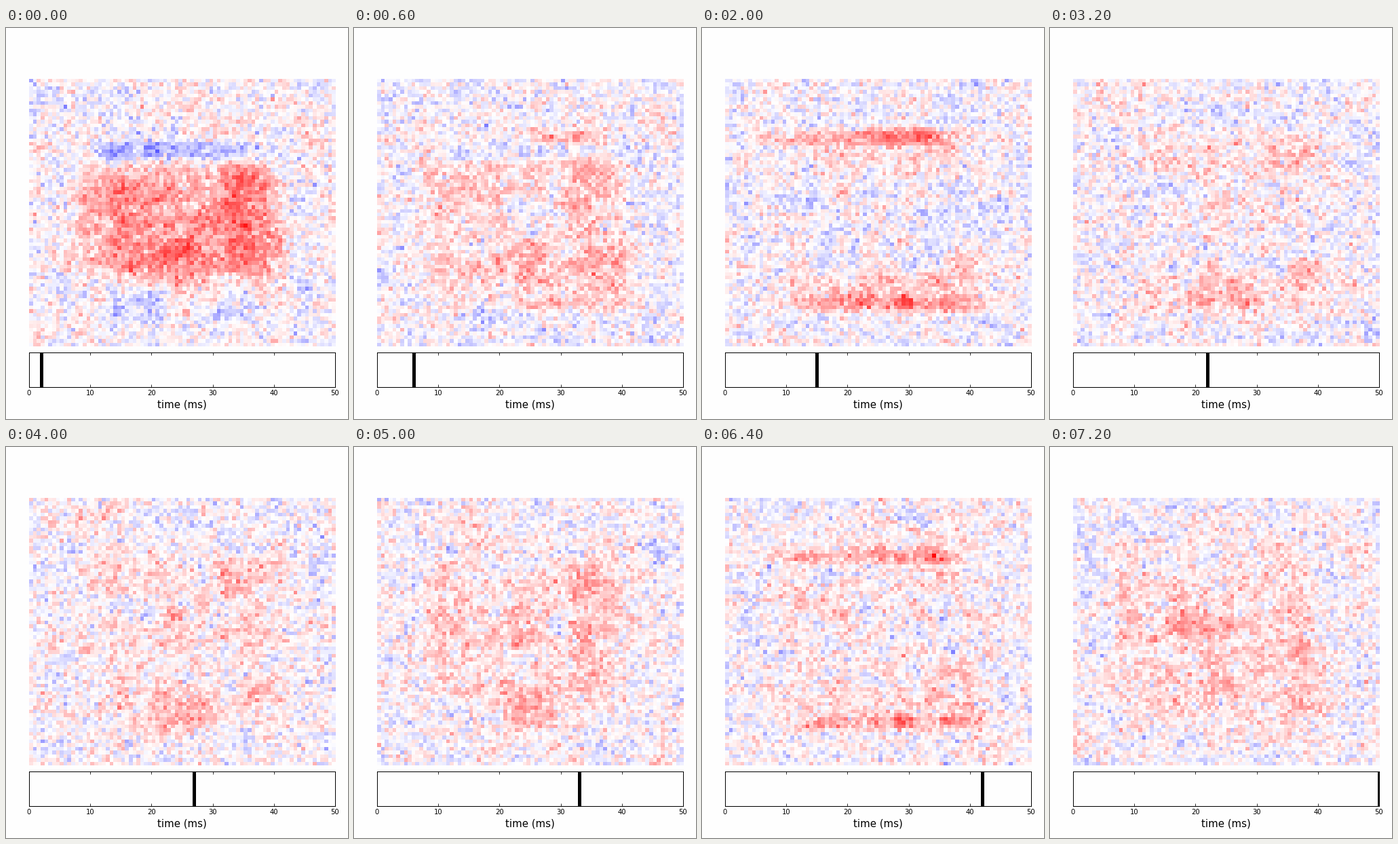
A matplotlib script that plays this animation: 504x576 px, repeating every 7.4 s.

```python
import numpy as np
import matplotlib.pyplot as plt
from matplotlib.animation import FuncAnimation

W, H, DPI = 504, 576, 72
COLS, ROWS = 80, 72
STEPS, INTERVAL = 37, 200
PAPER = "#fefefe"

# Image area in stage pixels, measured from the top left
LEFT, TOP, RIGHT, BOTTOM = 34, 75, 486, 469

# Soft-edged patches: centre x, centre y, half width, half height
PATCHES = {
    "body": (257, 287, 152, 86),
    "wide": (255, 285, 152, 132),
    "top": (235, 162, 145, 13),
    "topmid": (300, 160, 55, 12),
    "upper": (235, 185, 140, 34),
    "upright": (345, 185, 34, 34),
    "shoulder": (120, 190, 20, 25),
    "shelf": (250, 181, 110, 14),
    "core": (275, 282, 130, 52),
    "rim": (215, 323, 60, 9),
    "bottom": (277, 406, 152, 11),
    "lower": (268, 385, 145, 33),
    "hot": (298, 403, 14, 11),
    "belly": (260, 385, 38, 35),
    "column": (357, 270, 30, 85),
    "flank": (380, 360, 32, 38),
    "seed": (252, 335, 20, 24),
    "pocket_l": (192, 404, 42, 25),
    "pocket_r": (340, 410, 30, 24),
    "mid": (220, 268, 55, 32),
    "spine": (296, 262, 10, 30),
    "edge": (120, 245, 18, 80),
}

# Strength of each patch at a few moments (ms on the time axis)
STRENGTH = {
    2: dict(body=.38, shelf=-.32, column=.17, seed=.14, belly=.14,
            pocket_l=-.22, pocket_r=-.18, flank=.06),
    10: dict(upper=.14, topmid=.2, upright=.2, shoulder=.08, core=-.2,
             rim=-.2, spine=-.2, mid=.04, lower=.2, bottom=.17, flank=.18),
    15: dict(top=.25, topmid=.22, upright=.12, upper=.09, bottom=.28,
             lower=.14, belly=.1, hot=.25, flank=.1, core=-.06, mid=.06),
    22: dict(wide=.06, upright=.12, upper=.04, lower=.1, belly=.08,
             hot=.18, flank=.08, bottom=.04, core=-.04, mid=.04),
    33: dict(wide=.12, upright=.1, column=.1, edge=.1, mid=.1,
             belly=.13, shelf=-.02),
    42: dict(wide=.04, top=.17, topmid=.17, upright=.08, bottom=.28,
             hot=.2, flank=.15, lower=.04),
    50: dict(wide=.11, edge=.14, mid=.12, column=.09, flank=.12,
             belly=.08, seed=.08, hot=.08),
}
MOMENTS = list(STRENGTH)
REACHED_AT = [0, 6, 10, 16, 25, 32, 36]

x = LEFT + (np.arange(COLS) + .5) * (RIGHT - LEFT) / COLS
y = TOP + (np.arange(ROWS) + .5) * (BOTTOM - TOP) / ROWS
X, Y = np.meshgrid(x, y)


def patch(cx, cy, rx, ry):
    return np.exp(-((X - cx) / rx) ** 8 - ((Y - cy) / ry) ** 4)


def smooth_noise(rng, passes):
    """Unit-variance noise, blurred over neighbouring cells."""
    z = rng.standard_normal((ROWS, COLS))
    for _ in range(passes):
        for axis in (0, 1):
            z = (np.roll(z, 1, axis) + 2 * z + np.roll(z, -1, axis)) / 4
    return z / z.std()


SHAPES = {name: patch(*box) for name, box in PATCHES.items()}
base = np.random.default_rng(7)
GRAIN = [smooth_noise(base, 2) for _ in range(2)]
DRIFT = [smooth_noise(base, 14) for _ in range(2)]


def blend(pair, angle):
    return pair[0] * np.cos(angle) + pair[1] * np.sin(angle)


def time_at(i):
    return round(float(np.interp(i, REACHED_AT, MOMENTS)))


def field(i):
    t = time_at(i)
    signal = np.zeros((ROWS, COLS))
    for name, shape in SHAPES.items():
        course = [STRENGTH[m].get(name, 0) for m in MOMENTS]
        signal += np.interp(t, MOMENTS, course) * shape
    rng = np.random.default_rng(100 + i)
    return (signal + .06 * blend(GRAIN, t / 5) * SHAPES["wide"]
            + .03 * blend(DRIFT, t / 8)
            + .05 * smooth_noise(rng, 1)
            + .12 * rng.standard_normal((ROWS, COLS)))


def add_axes(left, bottom, width, height):
    return fig.add_axes([left / W, bottom / H, width / W, height / H])


plt.rcParams["font.family"] = "DejaVu Sans"
fig = plt.figure(figsize=(W / DPI, H / DPI), dpi=DPI, facecolor=PAPER)

map_ax = add_axes(LEFT, H - BOTTOM, RIGHT - LEFT, BOTTOM - TOP)
map_ax.axis("off")
image = map_ax.imshow(field(0), cmap="bwr", vmin=-1, vmax=1,
                      aspect="auto", interpolation="nearest")

time_ax = add_axes(33.8, 47, 451.2, 51)
time_ax.set(xlim=(0, 50), ylim=(0, 1), xticks=range(0, 51, 10), yticks=[],
            facecolor=PAPER)
time_ax.tick_params(axis="x", direction="in", top=True, length=4, width=.8,
                    pad=4, labelsize=10)
for spine in time_ax.spines.values():
    spine.set_linewidth(1)
marker = time_ax.axvline(time_at(0), color="black", linewidth=5)
fig.text(259.5 / W, 17 / H, "time (ms)", fontsize=15, ha="center",
         va="baseline")


def update(i):
    image.set_data(field(i))
    marker.set_xdata([time_at(i)] * 2)
    return image, marker


anim = FuncAnimation(fig, update, frames=STEPS, interval=INTERVAL,
                     repeat=True, repeat_delay=0)
plt.show()
```
